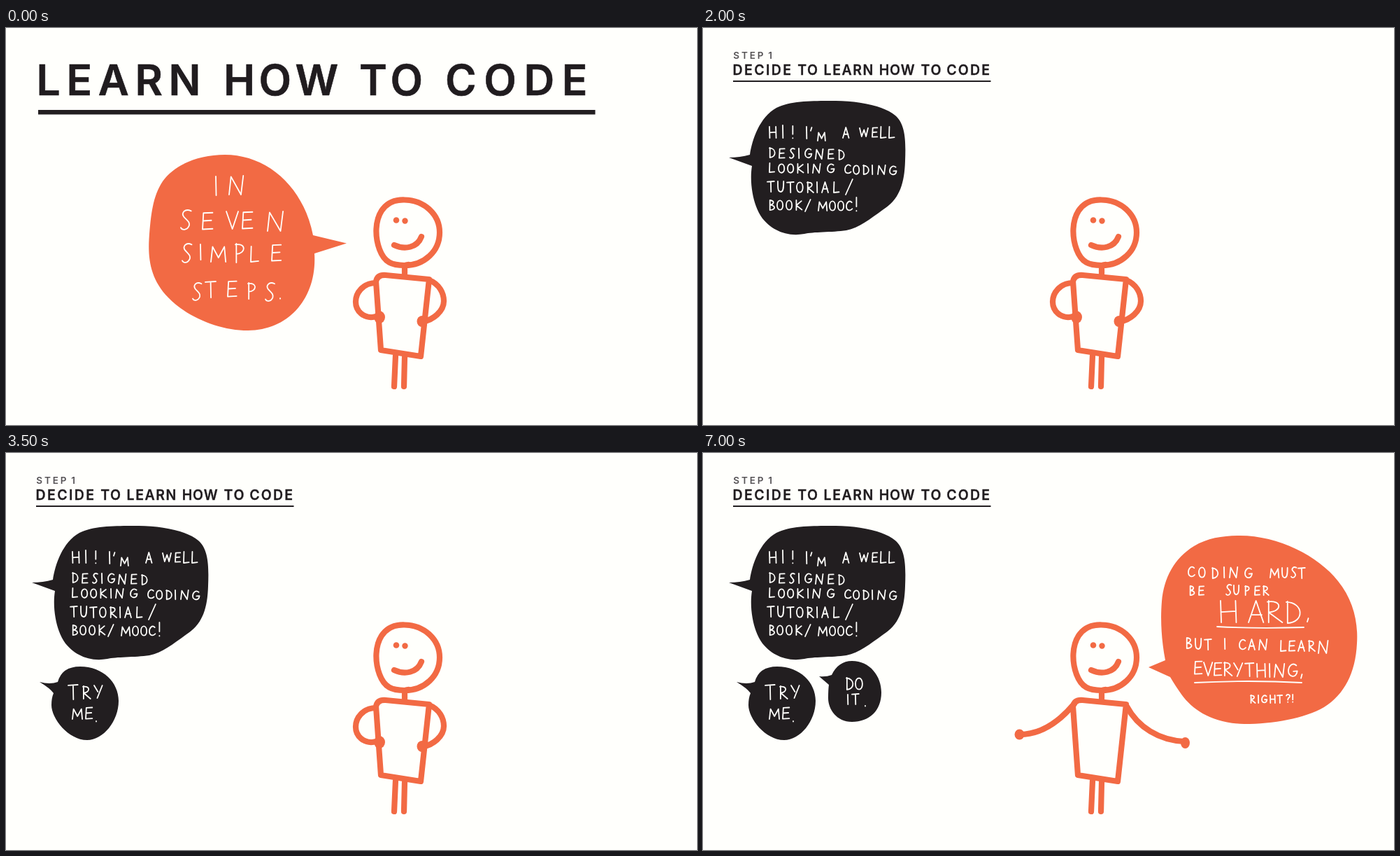
Animation, 988 px wide and 567 px high, one loop 8000 ms. Source, as an HTML page:

```html
<!DOCTYPE html>
<html lang="en">
<head>
<meta charset="utf-8">
<title>Learn how to code</title>
<style>
  html, body { margin: 0; width: 100%; height: 100%; overflow: hidden; background: #fffffc; }
  svg { display: block; width: 100vw; height: 100vh; }
  text { font-family: Inter, "Liberation Sans", sans-serif; font-weight: 600; font-kerning: none; fill: #201c1f; }
  .title { font-size: 60.5px; stroke: #201c1f; stroke-width: .6; }
  .sub { font-size: 19.5px; stroke: #201c1f; stroke-width: .3; }
  .step { font-size: 13.5px; }
  .step text { fill: #555255; }
  .line { fill: none; stroke-linecap: round; stroke-linejoin: round; }
  .person { stroke: #f26a44; stroke-width: 8.2; }
  .dot, .orange { fill: #f26a44; stroke: none; }
  .black { fill: #221e20; }
  .lime { stroke: #d7e021; stroke-width: 9; }
  .ink { stroke: #fffffc; stroke-width: 1.8; }
  .ink path { vector-effect: non-scaling-stroke; }
</style>
</head>
<body>
<svg viewBox="0 0 988 567">
  <rect width="988" height="567" fill="#fffffc"/>

  <g data-show="0-2000">
    <g id="title" class="title"></g>
    <rect x="46" y="117" width="796.5" height="6.5" class="black"/>
  </g>

  <g data-show="0-1000">
    <path class="orange" d="M313 181C372 181 425 225 439 296L487 307.500L441 322C445 385 405 432 346 432C304 432 258 412 232 385C207 359 203 331 204.500 302C207 262 211 239 224 219C240 196 274 181 313 181Z"/>
    <g id="intro" class="line ink" role="img" aria-label="In seven simple steps."></g>
  </g>

  <g data-show="1000-2000" class="line lime" role="img" aria-label="+ Feelings">
    <path d="M68 141Q67 170 68 202M46 170Q70 172 92 161"/>
    <path d="M121 151Q126 180 127 213M118 152Q130 149 140 142M123 180Q136 178 146 174"/>
    <path d="M183 150Q176 185 176 222Q187 229 196 226M174 150Q184 153 190 150M179 179Q192 181 199 176"/>
    <path d="M237 150Q226 180 225 209Q236 216 247 217Q251 215 249 211M230 150Q238 152 246 147M226 181L251 179"/>
    <path d="M280 154Q276 180 275 205Q287 208 295 206M320 152L324 208"/>
    <path d="M357 202L362 147L388 206L397 151"/>
    <path stroke-width="7" d="M450 156C443 145 432 151 426 163C415 184 417 212 430 216C441 219 451 204 453 193Q453 184 447 186L441 189"/>
    <path stroke-width="10" d="M497 149C488 139 474 146 476 158C478 172 501 183 500 204C498 222 480 223 477 212L481 214"/>
    <path fill="#d7e021" stroke="none" d="M543 212C535 201 520 180 519 165C518 149 533 147 541 161C546 148 562 148 560 165C558 181 551 199 548 211Q546 215 543 212Z"/>
  </g>

  <g data-show="2000-8000">
    <g id="step" class="step"></g>
    <g id="sub" class="sub"></g>
    <rect x="43" y="75" width="368.500" height="2" class="black"/>
    <path class="black" d="M67 181C70 160 81 127 105 114C126 103 165 104 190 104C222 104 258 111 275 125C290 138 290 163 289 190C288 224 280 245 258 259C241 271 224 285 205 289C184 292 157 291 145 294C118 299 97 287 85 272C72 255 66 222 70 197L37 185Q53 185 67 181Z"/>
    <g id="hello" class="line ink" role="img" aria-label="Hi! I'm a well designed looking coding tutorial/book/MOOC!"></g>
  </g>

  <g data-show="3500-8000">
    <path class="black" d="M48 327Q63 331 74 327Q80 305 106 305C139 305 161 328 161 354C161 383 139 410 116 410C89 410 65 379 65 360Q65 350 68 343Q63 336 48 327Z"/>
    <g id="tryMe" class="line ink" role="img" aria-label="Try me."></g>
  </g>

  <g data-show="4500-8000">
    <path class="black" d="M166 319Q176 320 184 317C190 304 200 297 213 297C239 297 255 319 255 342C255 368 238 384 213 384C191 384 179 366 179 350Q179 338 180 331Z"/>
    <g id="doIt" class="line ink" role="img" aria-label="Do it."></g>
  </g>

  <g class="line person">
    <path d="M570 245.500C598 246 620 266 620 292C620 319 598 339 570 339C552 339 541 335 534 316C527 297 528 275 537 261C545 249 556 245 570 245.500Z"/>
    <path d="M570 339V352M570 339L575 338"/>
    <path d="M529 362Q531 352 543 353L605 359L593 469L536 460Z"/>
    <path d="M557 468L555 512M570 470L569 512"/>
    <g data-show="0-1000 2000-8000">
      <circle class="dot" cx="558" cy="274.500" r="4.300"/>
      <circle class="dot" cx="570.500" cy="275.500" r="4.200"/>
      <path d="M555 310C570 317 588 314 594 298"/>
    </g>
    <g data-show="1000-2000">
      <circle class="dot" cx="554.500" cy="264" r="4.200"/>
      <circle class="dot" cx="544.500" cy="273" r="4"/>
      <path d="M549 306Q553 301 559.500 298"/>
    </g>
    <g data-show="0-5500">
      <path d="M529 364C511 364 500 378 500 391C500 405 512 414 524 413L535 411"/>
      <path d="M605 360C620 366 626 379 626 390C626 405 610 417 597 419"/>
      <ellipse class="dot" cx="534" cy="413" rx="8" ry="9"/>
      <ellipse class="dot" cx="595" cy="419" rx="7.500" ry="8"/>
    </g>
    <g data-show="5500-8000">
      <path d="M531 358C510 383 485 402 453 402M606 362C622 392 652 410 688 412"/>
      <ellipse class="dot" cx="452.500" cy="402" rx="7" ry="7.500"/>
      <ellipse class="dot" cx="689.500" cy="414" rx="6.500" ry="8"/>
    </g>
  </g>

  <g data-show="5500-8000">
    <path class="orange" d="M637 306L661 296C655 265 654 236 656 212C659 178 674 150 702 133C722 121 745 118 768 118C822 118 880 147 908 183C929 209 937 240 935 272C933 314 917 345 888 363C860 379 815 387 774 387C727 386 700 366 685 346Q675 332 668 320Z"/>
    <g id="reply" class="line ink" role="img" aria-label="Coding must be super hard, but I can learn everything, right?!">
      <path d="M735 248Q790 251 859 249M703 328Q780 324 856 328"/>
    </g>
  </g>
</svg>
<script>
const NS = 'http://www.w3.org/2000/svg';
const LOOP = 8000;
const $ = id => document.getElementById(id);

function add(parent, tag, attrs) {
  const el = document.createElementNS(NS, tag);
  for (const key in attrs) el.setAttribute(key, attrs[key]);
  return parent.appendChild(el);
}

// Each word: text, left edge, letter spacing.
function heading(id, y, words) {
  for (const [word, x, gap] of words)
    add($(id), 'text', { x, y, 'letter-spacing': gap }).textContent = word;
}

heading('title', 96, [['LEARN', 43.5, 8.7], ['HOW', 310.9, 5.5], ['TO', 505, 4.5], ['CODE', 628, 10.7]]);
heading('step', 44, [['STEP', 43.3, 2.9], ['1', 93.3, 0]]);
heading('sub', 66.5, [
  ['DECIDE', 42.6, 2.4], ['TO', 135.3, .8], ['LEARN', 172.6, 1.55],
  ['HOW', 251.8, .75], ['TO', 311.5, 1.2], ['CODE', 348.3, 2.2]
]);

// Pen strokes of the hand lettering, ten units high.
const pen = {
  A: 'M0 10L3 0L6 10M1 6.5H5.3',
  B: 'M.5 0V10M.5 0Q4.5 .5 4 2.5Q3.5 4.5 .5 4.8Q5.5 5.5 5 8Q4 10 .5 10',
  C: 'M5.5 1.5C3 -1.5 0 2 0 5.5C0 10 4 10.5 6 8',
  D: 'M.5 0V10M0 .3C7 .5 7.5 9.5 .5 10',
  E: 'M5.5 .3L.5 .5L0 9.8L5.5 9.5M.3 5L4.8 4.7',
  G: 'M6 1.3C3 -1.5 0 2 0 5.5C0 10 6 11.5 6.7 5.5L3.8 5.7',
  H: 'M0 0L.3 10M6 0L6.3 10M.2 5.2L6.2 4.8',
  I: 'M0 0L.2 10',
  K: 'M.3 0V10M5.5 .8L.3 5.2L6 9.6',
  L: 'M.3 0L0 10L5 9.5',
  M: 'M0 10L1 1L4.5 7.5L8 1L8.8 10',
  N: 'M0 10L1 .5L6.3 10L7.5 0',
  O: 'M3 .3C-1 .3 -1 9.8 3 9.8C7 9.8 6.5 .3 3 .3Z',
  P: 'M.5 0V10M0 .5C6 -.5 5.5 5.3 .5 5.5',
  R: 'M.5 0V10M0 .5C6 -.5 6 5 .5 5.3L6 10',
  S: 'M5 .5C2 -1 0 1.5 1.5 3.5C3 5.3 4.5 6 4 8C3 10.5 .5 10.3 0 9',
  T: 'M0 .4L6.5 0M3.3 .2L3.5 10',
  U: 'M0 0C0 6 -.2 10 2.8 10C5.5 10 5.5 5 5.5 0',
  V: 'M0 0L3.3 10L6.5 0',
  W: 'M0 0L2.5 10L5.5 2L8 10L10.5 0',
  Y: 'M0 0L3 5M6.5 0L2.5 10',
  '/': 'M4.5 0L0 10',
  '!': 'M.2 0V6.5M.2 9.5V9.7',
  '?': 'M0 1.5C1 -.8 5 -.3 4.5 2.5C4 4.5 2 4 2 6.8M2 9.7V9.8',
  '.': 'M0 0V.3',
  "'": 'M1 0L0 3',
  ',': 'M.8 0L0 3'
};

// Each mark: letter, then x, y and, where it differs, its height.
function write(id, height, marks, wide = 1) {
  for (const mark of marks.split(' ')) {
    const [x, y, h = height] = mark.slice(1).split(',').map(Number);
    add($(id), 'path', { d: pen[mark[0]], transform: `translate(${x} ${y}) scale(${h / 10 * wide} ${h / 10})` });
  }
}

write('intro', 27, 'I300,212 N319,211');
write('intro', 25, 'S250,260,28 E281,263 V315,262 E338,262 N374,262,28', 1.05);
write('intro', 24, 'S252,308,27 I278,309,22 M293,310 P328,308,27 L350,312,22 E380,309');
write('intro', 23, 'S267,364,25 T285,362 E317,361 P346,364 S371,364,26 .392,386');

write('hello', 16, "H95,141 I114,139,18 !128,140,18 I148,141,17 '154,142 M164,148,13 A200,142,15 W224,143,12 E242,142,14 L254,141 L266,141", .95);
write('hello', 14, 'D95,171 E109,172 S124,172 I137,172 G146,172 N161,173 E179,173 D194,174');
write('hello', 13, 'L95,193 O108,194 O121,194 K135,194 I150,194 N157,194 G178,194 C203,195 O215,196 D229,196 I242,196 N250,196 G267,197', 1.1);
write('hello', 15, 'T92,219 U107,219 T120,220 O134,220 R149,220 I163,220 A170,220 L187,220 /204,216,22');
write('hello', 14, 'B95,246 O106,246 O119,246 K133,246 /146,245,17 M165,247 O181,247 O193,247 C205,247 !219,242,20');

write('tryMe', 18, 'T89,331,21 R110,333 Y126,332 M95,364,16 E114,363,17 .129,383');
write('doIt', 17, 'D205,321 O218,321 I207,345,14 T213,344,15 .232,361');

write('reply', 15, 'C694,162 O709,163 D728,164 I745,163 N753,163 G775,164 M811,164,14 U828,164,14 S841,163 T851,164');
write('reply', 13, 'B696,190 E709,190 S748,188,15 U759,189 P775,190 E789,190 R801,190');
write('reply', 31, 'H740,211 A780,211 R807,211 D834,212 ,864,236,17', 1.15);
write('reply', 15, 'B691,264 U704,265 T717,266 I746,265 C767,266 A780,266 N795,266 L826,268 E838,268 A851,268 R866,268 N880,268,18');
write('reply', 19, 'E703,297 V716,299 E731,299 R745,299 Y759,300 T775,300 H792,301 I810,301 N817,301 G837,301 ,855,316');
write('reply', 11, 'R783,346 I794,346 G799,346 H811,346 T821,346 ?834,345 !843,345');

const scenes = [...document.querySelectorAll('[data-show]')].map(el => ({
  el, spans: el.dataset.show.split(' ').map(span => span.split('-').map(Number))
}));

function draw(time) {
  for (const { el, spans } of scenes) {
    const visible = spans.some(([from, to]) => time >= from && time < to);
    el.style.display = visible ? '' : 'none';
  }
}

const start = performance.now();
function tick() {
  draw((performance.now() - start) % LOOP);
  requestAnimationFrame(tick);
}
tick();
</script>
</body>
</html>
```
